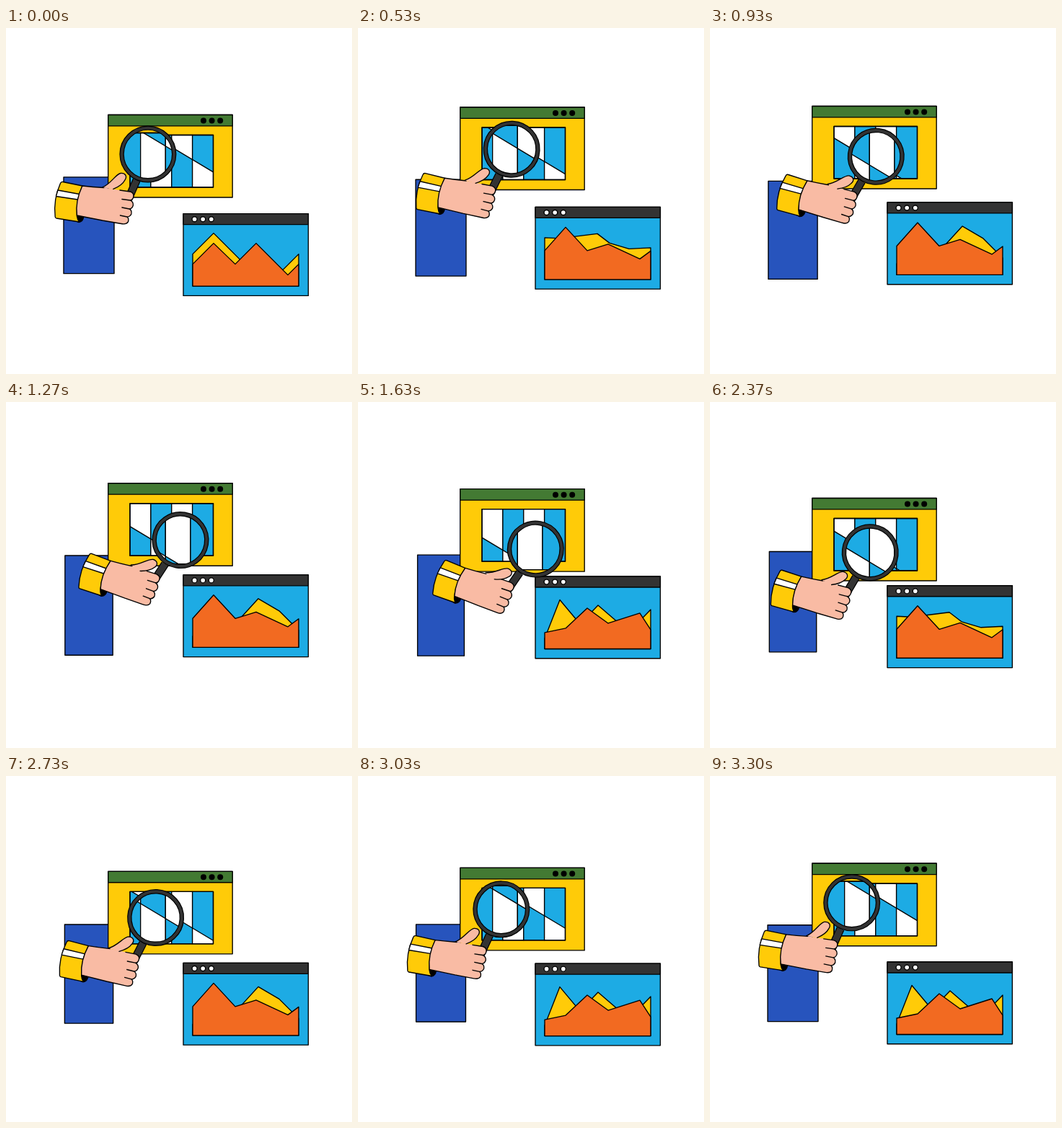
An HTML page that plays this animation: 480 px wide and 480 px high, repeating every 3.33 s.

```html
<!DOCTYPE html>
<html lang="en">
<head>
<meta charset="utf-8">
<title>Chart windows and magnifier</title>
<style>
  html, body { margin: 0; width: 100%; height: 100%; overflow: hidden; background: #fff; }
  svg { display: block; width: 100vw; height: 100vh; }
  .ink { stroke: #000; stroke-width: 1.35; stroke-linejoin: round; stroke-linecap: round; }
  .ink * { vector-effect: non-scaling-stroke; }
  .line { fill: none; }
  .yellow { fill: #ffcb08; }
  .sky { fill: #1dabe4; }
  .white { fill: #fff; }
  .skin { fill: #f9bba4; }
  .dark { fill: #333; }
</style>
</head>
<body>
<svg viewBox="0 0 480 480">
  <defs>
    <clipPath id="plot"><rect width="115.5" height="72.5"/></clipPath>
    <clipPath id="glass"><circle id="glassShape" r="35"/></clipPath>
  </defs>

  <rect id="panel" class="ink" fill="#2754bd"/>

  <g id="barWindow" class="ink">
    <rect class="yellow" x="141.7" width="172.5" height="114.5"/>
    <rect fill="#437a33" x="141.7" width="172.5" height="15.4"/>
    <g stroke="none">
      <circle cx="274" cy="8" r="4"/><circle cx="285.6" cy="8" r="4"/><circle cx="297.2" cy="8" r="4"/>
    </g>
    <g id="chart" transform="translate(172 28)"></g>
  </g>

  <g id="areaWindow" class="ink">
    <rect class="sky" x="246" width="173.4" height="113.8"/>
    <rect class="dark" x="246" width="173.4" height="15"/>
    <g class="white">
      <circle cx="261.6" cy="7.6" r="3.5"/><circle cx="273.2" cy="7.6" r="3.5"/><circle cx="284.8" cy="7.6" r="3.5"/>
    </g>
    <path id="back" class="yellow"/>
    <path id="front" fill="#f26a21"/>
  </g>

  <g clip-path="url(#glass)">
    <rect class="yellow" width="480" height="480"/>
    <g id="zoom" class="ink"></g>
  </g>

  <g id="hand" class="ink">
    <path class="line" d="M181.3 211 L169 239" stroke-width="11.5" stroke-linecap="butt"/>
    <path class="line" d="M181.3 211 L169 239" stroke="#333" stroke-width="9" stroke-linecap="butt"/>
    <circle class="line" cx="197" cy="175" r="36.3" stroke-width="6.4"/>
    <circle class="line" cx="197" cy="175" r="36.3" stroke="#333" stroke-width="4"/>

    <path d="M98 258 L108 261 Q107 269 101 269.5 L97 268 Z"/>
    <path class="yellow" d="M79 213.5 L106 219 Q97 240 98.5 261 Q99 266 102 269 L70 264 Q68.5 263.5 68.3 262 Q65.5 238 75.5 215.5 Q76.5 213 79 213.5 Z"/>
    <path class="white" d="M72 225 L102 230.5 L99.5 238 L69.5 233.5 Z"/>

    <path class="skin" stroke="none" d="M106 219 Q120 220.5 136 221.5 L158 225 L172 227 Q178 229 177 234 Q176 239 172 239
      Q177 241 176.5 246 Q175 251 171 251 Q175 253 174 258 Q172 262 168 262 Q171 264 169.5 269 Q167 273 160 271.5
      L134 267 L98.5 260 Q96 240 106 219 Z"/>
    <path class="line" d="M158 225 L172 227 Q178 229 177 234 Q176 239 172 239
      Q177 241 176.5 246 Q175 251 171 251 Q175 253 174 258 Q172 262 168 262 Q171 264 169.5 269 Q167 273 160 271.5
      L134 267 L98.5 260 Q96 240 106 219 Q120 220.5 136 221.5
      M172 239 L161 237.5 M171 251 L161 249 M168 262 L158.5 260"/>
    <path id="thumb" class="skin" d="M134 221 C146 216 152 203 159 201.5 C166 201 168.5 206 165 211 C162 217 156 220.5 149 223.5"/>
  </g>
</svg>

<script>
const LOOP = 3330, HALF = LOOP / 2;
const BAR = 28.875, PLOT_W = 4 * BAR, PLOT_H = 72.5, DROP = 0.6 * PLOT_W;
const $ = id => document.getElementById(id);
const set = (id, attrs) => { for (const k in attrs) $(id).setAttribute(k, attrs[k]); };

const bars = kinds => kinds.map((kind, i) =>
  `<rect class="${kind}" x="${i * BAR}" width="${BAR}" height="${PLOT_H}"/>`).join('');

// Bars swap colours below a sliding slope.
const buildChart = id => {
  $(id).innerHTML = `
    <clipPath id="${id}Under"><path id="${id}Clip"/></clipPath>
    ${bars(['white', 'sky', 'white', 'sky'])}
    <g clip-path="url(#plot)">
      <g clip-path="url(#${id}Under)">${bars(['sky', 'white', 'sky', 'white'])}</g>
      <path id="${id}Slope" class="line"/>
    </g>
    <rect class="line" width="${PLOT_W}" height="${PLOT_H}"/>`;
};
const slideChart = (id, y) => {
  const slope = `M0 ${y}L${PLOT_W} ${y + DROP}`;
  set(id + 'Slope', { d: slope });
  set(id + 'Clip', { d: slope + 'V200H0Z' });
};
buildChart('chart');
buildChart('zoom');

// Area charts hold each shape, then switch at once.
const frontX = [259, 288, 318, 347, 391, 406];
const area = (xs, ys) =>
  'M' + xs.map((x, i) => `${x} ${ys[i]}`).join('L') + 'L406 100.5L259 100.5Z';
const low = area(frontX, [60.5, 28, 60.5, 51.5, 72, 61]);
const states = [
  { until: 333, front: area(frontX, [70, 41, 70, 41, 85, 70]),
    back: area([259, 288, 332, 376, 406], [56, 27, 71, 86, 56]) },
  { until: 730, front: low,
    back: area([259, 280, 332, 349, 376, 406], [42.5, 43.5, 37, 50, 58, 56.5]) },
  { until: 1330, front: low,
    back: area([259, 318, 350, 379, 406], [85, 68, 33, 50, 77]) },
  { until: HALF, front: area(frontX, [78, 72, 44, 65, 51, 74]),
    back: area([259, 280, 308, 333, 376, 406], [86, 32.5, 66, 40, 77, 46]) }
];

function draw(now) {
  const t = now % LOOP;
  const wave = (mid, amp, peak) => mid + amp * Math.cos(2 * Math.PI * (t - peak) / LOOP);

  const w = wave(67.4, 3, 250), h = wave(137, -3.6, 250), cy = wave(277.9, 4.5, 1450);
  set('panel', { x: 115 - w / 2, y: cy - h / 2, width: w, height: h });

  const barTop = wave(121, -12.8, 812);
  set('barWindow', { transform: `translate(0 ${barTop})` });
  set('zoom', { transform: `translate(152 ${barTop + 25}) scale(1.2)` });
  slideChart('chart', wave(10.8, -28.7, 0));
  slideChart('zoom', wave(9.3, -28.7, 40));

  set('areaWindow', { transform: `translate(0 ${wave(250, -10.2, 1280)})` });
  const state = states.find(a => t % HALF < a.until);
  set('front', { d: state.front });
  set('back', { d: state.back });

  const p = 2 * Math.PI * t / LOOP;
  const x = 221.5 - 24 * Math.cos(p) + 4.7 * Math.sin(p) - 0.6 * Math.cos(3 * p);
  const y = 190 - 15.6 * Math.cos(p) - 15.2 * Math.sin(p) + 0.6 * Math.cos(3 * p);
  const turn = 5.35 * (1 - Math.cos(p));
  set('glassShape', { cx: x, cy: y });
  set('hand', { transform: `translate(${x} ${y}) rotate(${turn}) translate(-197 -175)` });
  set('thumb', { transform: `rotate(${turn * 1.6} 138 224)` });
}

function tick() {
  draw(performance.now());
  requestAnimationFrame(tick);
}
tick();
</script>
</body>
</html>
```
